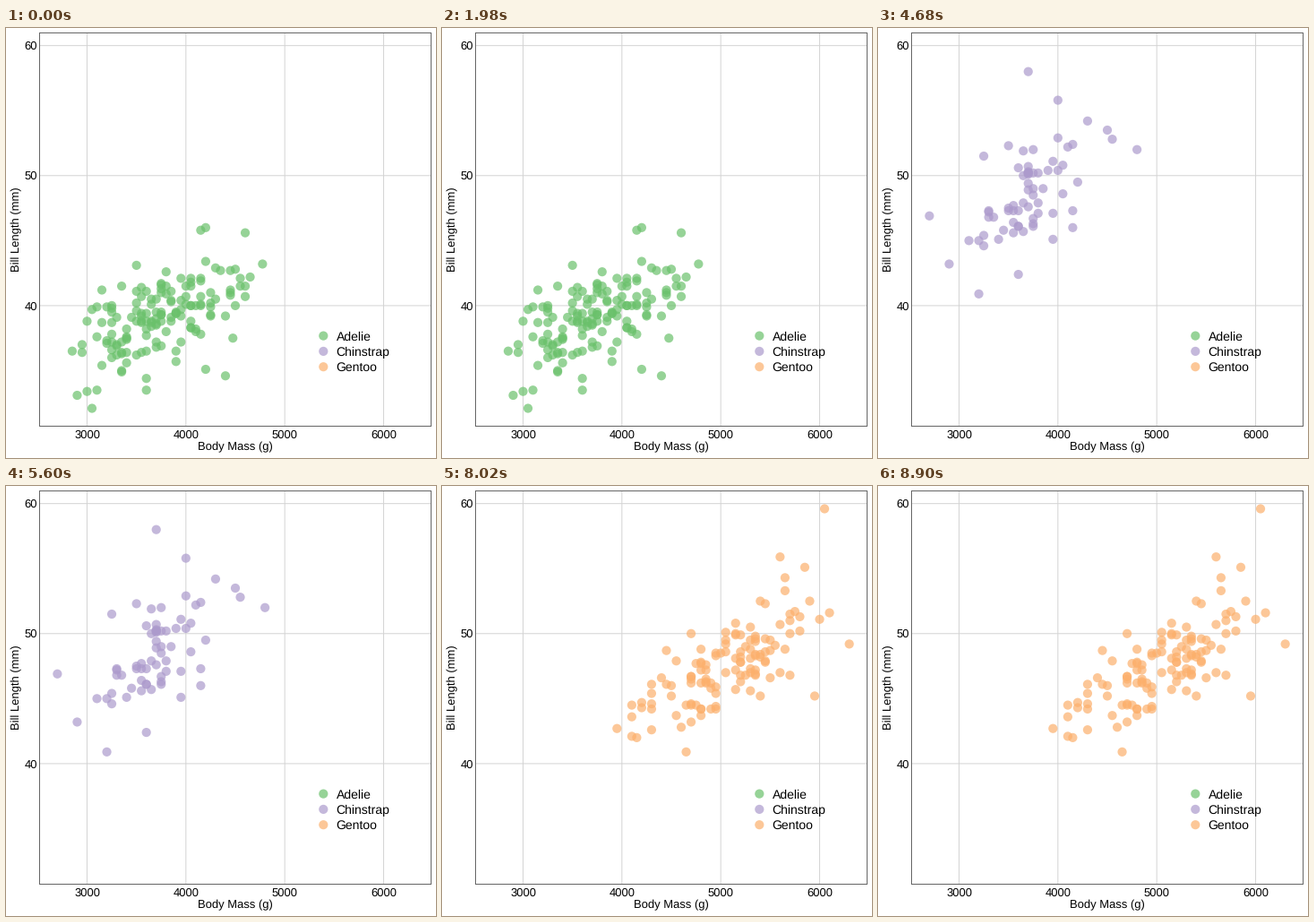
Write a matplotlib script that moves like this. It is 480 px wide and 480 px high and loops after 10 s.

```python
import matplotlib.pyplot as plt
import numpy as np
from matplotlib.animation import FuncAnimation

SIZE, DPI = 480, 100
PT = 72 / DPI  # points per pixel
LEFT, RIGHT, TOP, BOTTOM = 37.5, 474.5, 5.5, 444.5
XLIM, YLIM = (2520, 6480), (30.725, 60.975)
FRAMES, INTERVAL = 100, 100
DOT = 10.2

# mean and sd are (mass, bill) of the dense core; edge holds the outlying birds
SPECIES = [
    dict(name="Adelie", color="#6ac16b", turn=(0, 33), n=139, seed=4,
         mean=(3690, 38.8), sd=(450, 2.65), r=0.55,
         edge=[(2850, 36.5), (2900, 33.1), (3050, 32.1), (3600, 33.5),
               (4200, 35.1), (4400, 34.6), (4475, 37.5), (4775, 43.2),
               (4600, 45.6), (4200, 46.0), (4150, 45.8), (3500, 43.1)]),
    dict(name="Chinstrap", color="#ac9acc", turn=(33, 67), n=56, seed=7,
         mean=(3715, 48.7), sd=(335, 2.9), r=0.58,
         edge=[(2700, 46.9), (2900, 43.2), (3200, 40.9), (3600, 42.4),
               (4150, 46.0), (4800, 52.0), (4550, 52.8), (4500, 53.5),
               (4300, 54.2), (4000, 55.8), (3700, 58.0), (3250, 51.5)]),
    dict(name="Gentoo", color="#fcb06c", turn=(67, 100), n=111, seed=11,
         mean=(5050, 47.4), sd=(490, 2.75), r=0.7,
         edge=[(3950, 42.7), (4150, 42.0), (4100, 44.5), (4650, 40.9),
               (5950, 45.2), (6300, 49.2), (6000, 51.1), (5850, 55.1),
               (6050, 59.6), (5600, 55.9), (5650, 54.3), (4450, 48.7)]),
]

plt.rcParams.update({"font.family": "Liberation Sans",
                     "text.hinting": "no_hinting"})
fig = plt.figure(figsize=(SIZE / DPI, SIZE / DPI), dpi=DPI, facecolor="white")
ax = fig.add_axes([LEFT / SIZE, 1 - BOTTOM / SIZE,
                   (RIGHT - LEFT) / SIZE, (BOTTOM - TOP) / SIZE])
ax.set(xlim=XLIM, ylim=YLIM, xticks=[], yticks=[])
for spine in ax.spines.values():
    spine.set(color="#666666", linewidth=PT, snap=False)


def to_px(mass, bill):
    x = np.interp(mass, XLIM, (LEFT, RIGHT))
    y = np.interp(bill, YLIM, (BOTTOM, TOP))
    return x, y


def label(x, y, text, size=13, ha="center", **kw):
    fig.text(x / SIZE, 1 - y / SIZE, text, fontsize=size * PT, ha=ha,
             va="baseline", color="black", **kw)


def dots(points, colors, **kw):
    x, y = np.transpose(points)
    return ax.scatter(x, y, s=(DOT * PT) ** 2, color=colors, alpha=0.7,
                      linewidths=0, zorder=2, snap=False, **kw)


def flock(sp):
    """Correlated cloud, cut at an ellipse and rounded like field notes."""
    z = np.random.default_rng(sp["seed"]).normal(size=(4 * sp["n"], 2))
    z = z[np.hypot(*z.T) < 2.2][:sp["n"]]
    r = sp["r"]
    z[:, 1] = r * z[:, 0] + np.sqrt(1 - r * r) * z[:, 1]
    core = np.array(sp["mean"]) + z * sp["sd"]
    core = np.column_stack([np.round(core[:, 0] / 50) * 50,
                            np.round(core[:, 1], 1)])
    return np.vstack([core, sp["edge"]])


grid = dict(color="#d4d4d4", linewidth=PT, zorder=1, snap=False)
for mass in range(3000, 7000, 1000):
    ax.axvline(mass, **grid)
    label(to_px(mass, 40)[0], 458.2, str(mass))
for bill in (40, 50, 60):
    ax.axhline(bill, **grid)
    label(34.7, to_px(3000, bill)[1] + 4.5, str(bill), ha="right")

label(256, 471, "Body Mass (g)")
label(15.2, 225, "Bill Length (mm)", rotation=90, rotation_mode="anchor")

rows = [343.6 + 17.3 * i for i in range(len(SPECIES))]
dots([(354.3 / SIZE, 1 - y / SIZE) for y in rows],
     [sp["color"] for sp in SPECIES], transform=fig.transFigure)
for sp, y in zip(SPECIES, rows):
    label(368.5, y + 5, sp["name"], size=14, ha="left")

clouds = []
for sp in SPECIES:
    points = flock(sp)
    clouds.append(dots(points, [sp["color"]] * len(points)))


def update(frame):
    for cloud, sp in zip(clouds, SPECIES):
        start, end = sp["turn"]
        cloud.set_visible(start <= frame < end)
    return clouds


anim = FuncAnimation(fig, update, frames=FRAMES, interval=INTERVAL,
                     repeat=True, repeat_delay=0)
plt.show()
```
